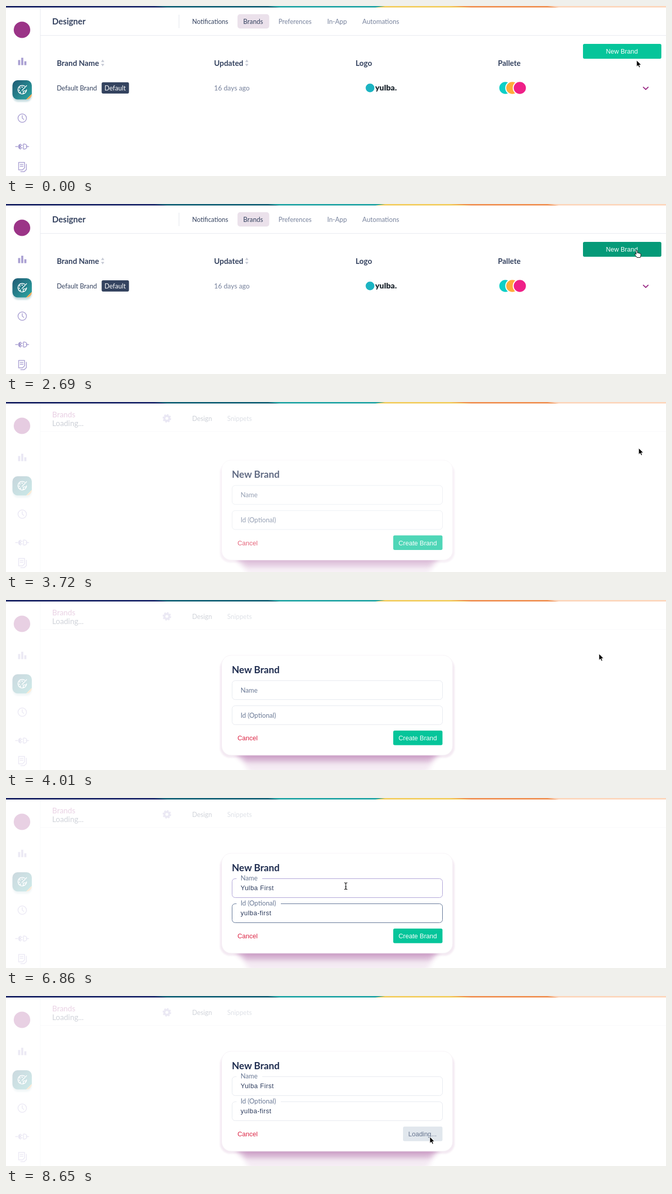
Write an HTML page that moves like this. It is 1280x332 px and loops after 8800 ms.

```html
<!DOCTYPE html>
<html lang="en">
<head>
<meta charset="utf-8">
<title>New brand</title>
<style>
  html, body { margin: 0; width: 100%; height: 100%; overflow: hidden; background: #fff; }
  svg { display: block; width: 100vw; height: 100vh; }
  text { font-family: Lato, "Open Sans", sans-serif; font-size: 12.7px; fill: #34425f; white-space: pre; }
  .soft { fill: #78839d; }
  .head { font-size: 14.8px; font-weight: 700; }
  .big { font-size: 14.8px; }
  .btn { font: 12.5px "Liberation Sans", Arial, sans-serif; }
  .input { font: 12.5px "Liberation Sans", Arial, sans-serif; letter-spacing: .5px; fill: #2b3a5c; }
  .white { fill: #fff; }
  .label { fill: #6b7a96; }
  .line { fill: none; stroke: #a99fd2; stroke-width: 1.5; stroke-linecap: round; stroke-linejoin: round; }
  .box { fill: #fff; stroke-width: 1; }
</style>
</head>
<body>
<svg viewBox="0 0 1280 332" preserveAspectRatio="none">
  <defs>
    <linearGradient id="tile" x1="0" y1="0" x2="1" y2="1">
      <stop offset="0" stop-color="#205a74"/>
      <stop offset=".85" stop-color="#2a9c9c"/>
      <stop offset=".86" stop-color="#f0b25e"/>
      <stop offset="1" stop-color="#f0955a"/>
    </linearGradient>
    <linearGradient id="navy">
      <stop offset="0" stop-color="#1d2766"/>
      <stop offset="1" stop-color="#232f70"/>
    </linearGradient>
    <filter id="blur2" x="-10%" y="-20%" width="120%" height="140%"><feGaussianBlur stdDeviation="1.5"/></filter>
    <filter id="blur5" x="-10%" y="-40%" width="120%" height="180%"><feGaussianBlur stdDeviation="5"/></filter>
    <path id="sort" d="M0 104.5l3.2 5h-6.4zM0 118l3.2-5h-6.4z" fill="#c8ccd7"/>
  </defs>

  <rect width="1280" height="332" fill="#fff"/>

  <!-- sidebar -->
  <path d="M66.5 3V332M66 57.5H1280" stroke="#e8eaf0"/>
  <circle cx="31" cy="46.5" r="16" fill="#9b3487"/>
  <path d="M23.5 105.5h4v10h-4zM29.5 101h4v14.5h-4zM35.5 108h4v7.5h-4z" fill="#a99fd2"/>
  <rect x="13" y="150" width="37" height="37" rx="11" fill="#4b8f9b" opacity=".3" filter="url(#blur2)"/>
  <rect x="12.5" y="145" width="37.5" height="37.5" rx="10" fill="url(#tile)"/>
  <g class="line" style="stroke:#fff">
    <path d="M36 156.500a8.300 8.300 0 1 0 3.800 7c0 2-1.600 2.600-3.600 2.400c-2.400-.3-3.400 1.300-2.600 3.200c.5 1.400-.5 2.400-2 2.600"/>
    <path d="M31 165l9-9.500"/>
  </g>
  <path d="M27 160h.01M31.300 158.500h.01M25.800 164.500h.01M28 168.500h.01" stroke="#fff" stroke-width="2.400" stroke-linecap="round"/>
  <g class="line">
    <circle cx="31.500" cy="219" r="8.200"/>
    <path d="M31.500 214v5l3 2.500"/>
    <path d="M18.500 274.500h4M39 274.500h5M34 269.500h1.500a5 5 0 0 1 0 10H34z"/>
    <path d="M36 305.500H24.500v14.500h7.500l4-4zM27.500 309.500h5.500M27.500 313h5.500M39.500 309v10.500l-4 4h-7"/>
  </g>
  <path d="M29 269a5.500 5.500 0 0 0 0 11zM28 271h4v1.800h-4zM28 276.200h4v1.800h-4z" fill="#a99fd2"/>

  <g id="list">
    <text x="89.500" y="36" style="font-size:16.300px;font-weight:700">Designer</text>
    <path d="M335.500 17V43" stroke="#e3e6ed"/>
    <rect x="449" y="16" width="61.500" height="28" rx="5" fill="#ebe1eb"/>
    <text x="361" y="34.500" style="font-size:12.400px">Notifications</text>
    <text x="460" y="34.500">Brands</text>
    <text x="528.500" y="34.500" class="soft" style="font-size:12.400px">Preferences</text>
    <text x="623" y="34.500" class="soft">In-App</text>
    <text x="691" y="34.500" class="soft">Automations</text>

    <rect id="newBtn" x="1119" y="74" width="152" height="29" rx="3"/>
    <text x="1163.500" y="93" class="btn white">New Brand</text>

    <text x="98.500" y="117" class="head">Brand Name</text>
    <text x="403.500" y="117" class="head">Updated</text>
    <text x="678" y="117" class="head">Logo</text>
    <text x="954" y="117" class="head" style="font-size:14.500px">Pallete</text>
    <use href="#sort" x="187.500"/><use href="#sort" x="467"/>

    <text x="98.500" y="164.500">Default Brand</text>
    <rect x="185.500" y="149" width="53" height="22" rx="3" fill="#34435f"/>
    <text x="191" y="164.500" class="white" style="font-size:12.600px">Default</text>
    <text x="403.500" y="164.500" class="soft" style="font-size:13.200px">16 days ago</text>
    <circle cx="706" cy="160" r="8.500" fill="#1cb4c2"/>
    <text x="716" y="164.500" style="font-size:15.500px;font-weight:900;fill:#222b33">yulba.</text>
    <g stroke="#fff" stroke-width="2">
      <circle cx="968.500" cy="160" r="12.800" fill="#0ccfc7"/>
      <circle cx="982" cy="160" r="12.800" fill="#ffab3a"/>
      <circle cx="996.500" cy="160" r="12.800" fill="#ef2088"/>
    </g>
    <path d="M1236 158.500l4.700 4.500l4.700-4.500" class="line" style="stroke:#9b2d86;stroke-width:1.800"/>
  </g>

  <g id="detail">
    <text x="89.500" y="29.500" class="big" style="fill:#a5408f">Brands</text>
    <text x="89.500" y="46.500" class="big">Loading...</text>
    <circle cx="312" cy="32" r="4.800" fill="none" stroke="#a99fd2" stroke-width="4"/>
    <circle cx="312" cy="32" r="7.300" fill="none" stroke="#a99fd2" stroke-width="2" stroke-dasharray="3.200 2.530"/>
    <text x="361" y="37">Design</text>
    <text x="429" y="37" class="soft">Snippets</text>
  </g>

  <rect id="veil" y="3" width="1280" height="329" fill="#fff"/>

  <g id="modal">
    <g fill="#95388a">
      <rect x="462" y="290" width="364" height="46" rx="20" opacity=".1" filter="url(#blur5)"/>
      <rect x="446" y="250" width="394" height="66" rx="24" opacity=".32" filter="url(#blur5)"/>
      <rect x="415" y="113" width="455" height="195" rx="20" opacity=".1" filter="url(#blur2)"/>
    </g>
    <rect x="418.500" y="108" width="447.500" height="195" rx="18" fill="#fff" stroke="#f7f3f7"/>
    <text x="438" y="142.500" style="font-size:18.700px;font-weight:700;fill:#1f2d50">New Brand</text>

    <rect id="nameBox" class="box" x="438.500" y="157.500" width="408" height="37" rx="6"/>
    <rect id="nameGap" x="447" y="156" width="50" height="4" fill="#fff"/>
    <text id="nameLabel" class="label" x="455">Name</text>
    <text id="nameText" class="input" x="455" y="180"></text>

    <rect id="idBox" class="box" x="438.500" y="206.500" width="408" height="37" rx="6"/>
    <rect id="idGap" x="447" y="205" width="86" height="4" fill="#fff"/>
    <text id="idLabel" class="label" x="455">Id (Optional)</text>
    <text id="idText" class="input" x="455" y="229"></text>

    <rect id="caret" width="1" height="15" fill="#1f2d50"/>
    <text x="449" y="274" class="btn" style="fill:#dc2444">Cancel</text>
    <rect id="saveBtn" y="255" height="28.500" rx="3"/>
    <text id="saveText" y="274" class="btn"></text>
  </g>

  <!-- colour strip -->
  <rect width="1280" height="3" fill="#fcd7be"/>
  <path d="M0 0H1050L1072 3H0z" fill="#f0955a"/>
  <path d="M0 0H862L902 3H0z" fill="#f3cf66"/>
  <path d="M0 0H735L716 3H0z" fill="#2ba8a8"/>
  <path d="M0 0H508L530 3H0z" fill="#1b667a"/>
  <path d="M0 0H288L312 3H0z" fill="url(#navy)"/>

  <g id="pointer">
    <path id="arrow" d="M0 0V12.500L2.900 9.900L4.800 14.300L7 13.400L5.100 9.100H9z" fill="#000" stroke="#fff" stroke-width=".9"/>
    <path id="hand" d="M-1.600 8.500V1.600a1.500 1.500 0 0 1 3 0V6c.4-1 2.400-.9 2.600.5c.5-.8 2.300-.6 2.500.7c.6-.6 2-.3 2 1.200V11c0 2-1.200 2.800-1.200 4.600H.2c-.4-2-3-3.600-4.600-6.200c-.8-1.400.8-2.400 1.800-1.200z" fill="#fff" stroke="#000" stroke-width="1.100"/>
    <g id="beam" fill="none">
      <path d="M-3-6.500q3 0 3 2v9q0 2-3 2M3-6.500q-3 0-3 2v9q0 2 3 2M-1.500 1.500h3" stroke="#fff" stroke-width="2.600"/>
      <path d="M-3-6.500q3 0 3 2v9q0 2-3 2M3-6.500q-3 0-3 2v9q0 2 3 2M-1.500 1.500h3" stroke="#111" stroke-width="1.200"/>
    </g>
  </g>
</svg>

<script>
const LOOP = 8800;
const NAME = "Yulba First", ID = "yulba-first";
const GREEN = [5, 197, 154], DARK = [5, 154, 120], GREY = [225, 231, 237];
const PLAIN = [230, 233, 239], HOVER = [172, 160, 214], FOCUS = [90, 111, 146];

const $ = id => document.getElementById(id);
const set = (id, attrs) => { for (const k in attrs) $(id).setAttribute(k, attrs[k]); };
const mix = (a, b, p) => a.map((v, i) => Math.round(v + (b[i] - v) * p));
const rgb = c => `rgb(${c})`;
const show = (id, on) => { $(id).style.display = on ? "" : "none"; };

// Each step changes only the listed values and holds until the next one.
const steps = [
  [0, { page: "list", cur: ["arrow", 1223, 106], size: 1, add: 0, veil: 0, modal: [0, 0],
        name: 0, nameUp: 0, nameLine: PLAIN, id: 0, idUp: 0, idLine: PLAIN,
        caret: "", save: GREEN, busy: 0 }],
  [450, { cur: ["arrow", 1224, 100], add: .3 }],
  [600, { cur: ["hand", 1224, 92], add: .8 }],
  [740, { cur: ["hand", 1223.5, 90.5], add: 1 }],
  [2690, { size: .9 }],
  [2840, { size: 1 }],
  [3430, { page: "detail", cur: ["arrow", 1227, 90], veil: .1 }],
  [3580, { veil: .45, modal: [14, .25] }],
  [3720, { veil: .75, modal: [5.5, .7] }],
  [3870, { veil: .77, modal: [0, 1], cur: ["arrow", 1150, 105] }],
  [4020, { cur: ["beam", 800, 165], nameLine: HOVER }],
  [4160, { cur: ["beam", 659, 172], nameLine: mix(HOVER, FOCUS, .6), nameUp: .6, caret: "name" }],
  [4310, { nameLine: FOCUS, nameUp: 1, name: 1 }],
  [4610, { name: 3 }],
  [4910, { name: 8 }],
  [5060, { name: 11 }],
  [5510, { nameLine: mix(FOCUS, HOVER, .5), idLine: mix(PLAIN, FOCUS, .5), idUp: .5, caret: "id" }],
  [5660, { nameLine: HOVER, idLine: FOCUS, idUp: 1, id: 2 }],
  [5810, { id: 7 }],
  [6260, { id: 11 }],
  [6860, { caret: "" }],
  [7310, { caret: "id", cur: ["arrow", 716, 200], nameLine: mix(HOVER, PLAIN, .5) }],
  [7460, { cur: ["hand", 806, 266], nameLine: PLAIN, save: mix(GREEN, DARK, .5) }],
  [7760, { cur: ["hand", 815, 273], save: DARK }],
  [7910, { cur: ["hand", 818.5, 276], caret: "" }],
  [8060, { size: .98 }],
  [8360, { size: 1, cur: ["arrow", 822, 275], busy: 1, save: mix(DARK, GREY, .5), idLine: mix(FOCUS, PLAIN, .5) }],
  [8510, { save: mix(DARK, GREY, .9), idLine: mix(FOCUS, PLAIN, .9) }],
  [8650, { save: GREY, idLine: PLAIN }]
];

function field(key, text, top, s) {
  const up = s[key + "Up"];
  $(key + "Text").textContent = text.slice(0, s[key]);
  set(key + "Label", { y: top + 23 - 20 * up });
  set(key + "Box", { stroke: rgb(s[key + "Line"]) });
  show(key + "Gap", up > 0);
  if (s.caret === key) {
    const end = s[key] ? $(key + "Text").getComputedTextLength() : 0;
    set("caret", { x: Math.round(455 + end), y: top + 10.5 });
  }
}

function draw(s) {
  show("list", s.page === "list");
  show("detail", s.page === "detail");
  show("caret", s.caret);
  set("newBtn", { fill: rgb(mix(GREEN, DARK, s.add)) });
  set("veil", { opacity: s.veil });
  set("modal", { opacity: s.modal[1], transform: `translate(0 ${s.modal[0]})` });
  field("name", NAME, 157.5, s);
  field("id", ID, 206.5, s);

  const x = s.busy ? 770 : 751;
  set("saveBtn", { x, width: 846.5 - x, fill: rgb(s.save) });
  set("saveText", { x: x + 10.3 });
  $("saveText").textContent = s.busy ? "Loading..." : "Create Brand";
  $("saveText").style.fill = s.busy ? "#66758f" : "#fff";

  const [kind, px, py] = s.cur;
  for (const k of ["arrow", "hand", "beam"]) show(k, k === kind);
  set("pointer", { transform: `translate(${px} ${py}) scale(${s.size})` });
}

let last = -1;
function tick(now) {
  const t = now % LOOP;
  const past = steps.filter(([at]) => at <= t);
  if (past.length !== last) {
    last = past.length;
    draw(Object.assign({}, ...past.map(([, change]) => change)));
  }
  requestAnimationFrame(tick);
}
tick(performance.now());
</script>
</body>
</html>
```
